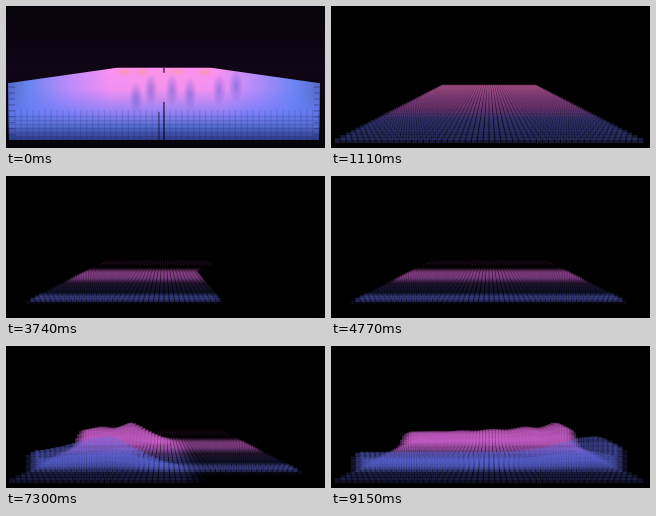
Write an HTML page with a canvas that moves like this. It is 319 by 142 pixels and loops after 9170 ms.

```html
<!DOCTYPE html>
<html>
<head>
<meta charset="utf-8">
<style>
html, body { margin: 0; width: 100%; height: 100%; overflow: hidden; background: #000; }
canvas { display: block; }
</style>
</head>
<body>
<canvas id="stage" width="319" height="142"></canvas>
<script>
const ctx = document.getElementById('stage').getContext('2d');
const LOOP = 9170, CX = 158, HORIZON = 55, HALF = 1.886;
const NEAR = 82, FAR = 25, ROWS = 60, COLS = 52;
const PITCH = 2 * HALF / COLS, SPEED = 1.25;

const clamp = (v, lo = 0, hi = 1) => Math.max(lo, Math.min(hi, v));
const smooth = (a, b, v) => { const k = clamp((v - a) / (b - a)); return k * k * (3 - 2 * k); };
const bump = (v, mid, width) => Math.exp(-(((v - mid) / width) ** 4));
const mix = (a, b, k) => a.map((v, i) => v + (b[i] - v) * k);

const BLUE = [98, 108, 228], PINK = [208, 100, 210], ROSE = [222, 108, 176];

// Rows from back to front; s is the perspective scale of a row
const rows = Array.from({ length: ROWS }, (_, i) => {
  const far = 1 - i / (ROWS - 1);
  const s = NEAR / (1 + far * (NEAR / FAR - 1));
  const rgb = s < 44 ? mix(ROSE, PINK, (s - FAR) / (44 - FAR)) : mix(PINK, BLUE, smooth(46, 64, s));
  return {
    s,
    color: `rgb(${rgb.map(Math.round)})`,
    glow: 0.32 * bump(s, 46, 6) + 0.36 * bump(s, 69, 4) + 0.1 * bump(s, 58, 6) + 0.03 * bump(s, 33, 3),
    wake: 0.17 * smooth(36, 44, s),
    rise: clamp(bump(s, 43.5, 4.5) + bump(s, 71, 4.5) + 0.25 * bump(s, 58, 9)),
    lead: 0.65 * (1 - smooth(34, 42, s)),
    front: s > 58
  };
});

// Height of the travelling swell; d is the distance behind its crest
function swell(d, front) {
  if (d < 0) return 0.5 * Math.exp(-((-d / 0.65) ** 1.5));
  if (front) return 0.27 + 0.23 * Math.exp(-2 * d * d);
  return 0.27 + 0.23 * Math.exp(-0.8 * d) * (0.82 + 0.18 * Math.cos(d * 8.4));
}

function drawColumn(u, s, height) {
  const w = PITCH * s * 0.86, x = CX + u * s - w / 2;
  for (let y = 0; y < height - 0.005; y += PITCH) {
    const h = Math.min(PITCH * 0.92, height - y) * s;
    ctx.fillRect(x, HORIZON + s - y * s - h, w, h);
  }
}

function drawGrid(t) {
  const edge = -0.5 + 1.22 * (t - 2.68);
  const crest = -1.86 + SPEED * (t - 6.43);
  const floor = 0.24 * clamp((1.9 - t) / 0.79, 0, 1.4);
  for (const row of rows) {
    ctx.fillStyle = row.color;
    for (let c = 0; c < COLS; c++) {
      const u = (c + 0.5) * PITCH - HALF, d = crest - u;
      const lit = smooth(-0.05, 0.07, edge + row.lead - u);
      const height = Math.max(PITCH * 0.85, swell(d, row.front) * row.rise);
      const wake = smooth(-1.35, -0.95, d) * row.wake;
      const alpha = floor + lit * (row.glow + wake) / (1 + 1.6 * height);
      if (alpha < 0.008) continue;
      ctx.globalAlpha = alpha;
      drawColumn(u, row.s, height);
    }
  }
  ctx.globalAlpha = 1;
}

function drawEdges() {
  ctx.strokeStyle = 'rgba(60,60,130,.16)';
  ctx.setLineDash([2, 3]);
  ctx.beginPath();
  for (const side of [-1, 1]) {
    ctx.moveTo(CX + side * HALF * 32, HORIZON + 32);
    ctx.lineTo(CX + side * HALF * NEAR, HORIZON + NEAR);
  }
  ctx.stroke();
  ctx.setLineDash([]);
}

function gradient(x1, y1, x2, y2, stops) {
  const g = ctx.createLinearGradient(x1, y1, x2, y2);
  stops.forEach(([at, color]) => g.addColorStop(at, color));
  return g;
}

function blob(x, y, rx, ry, color) {
  ctx.save();
  ctx.translate(x, y);
  ctx.scale(rx, ry);
  const g = ctx.createRadialGradient(0, 0, 0, 0, 0, 1);
  g.addColorStop(0, `rgba(${color},.45)`);
  g.addColorStop(1, `rgba(${color},0)`);
  ctx.fillStyle = g;
  ctx.fillRect(-1, -1, 2, 2);
  ctx.restore();
}

// The whole volume glowing, sinking towards the floor
function drawVolume(t) {
  const left = 1 - clamp((t - 0.06) / 0.88);
  if (!left) return;
  const height = 0.73 * left;
  const back = HORIZON + FAR * (1 - height), front = HORIZON + NEAR * (1 - height);
  ctx.save();
  ctx.globalAlpha = left * left;
  ctx.fillStyle = gradient(0, 0, 0, 142, [[0, '#06030a'], [0.45, '#100616'], [1, '#05030a']]);
  ctx.fillRect(0, 0, 319, 142);
  ctx.beginPath();
  [[2, front], [111, back], [205, back], [314, front], [313, 134], [3, 134]].forEach(p => ctx.lineTo(...p));
  ctx.clip();
  ctx.fillStyle = gradient(2, 0, 314, 0, [
    [0, '#5468c4'], [0.07, '#6c86f0'], [0.2, '#c48cfa'], [0.33, '#fc92f2'], [0.5, '#ff94ea'],
    [0.67, '#fc92f2'], [0.8, '#b48cfa'], [0.92, '#6c86f0'], [1, '#5468c4']]);
  ctx.fillRect(0, 0, 319, 142);
  ctx.fillStyle = gradient(0, back, 0, 134, [
    [0, 'rgba(100,120,250,0)'], [0.3, 'rgba(100,120,250,.08)'], [0.62, 'rgba(100,122,246,.7)'],
    [0.8, '#566ed2'], [1, '#2c3a88']]);
  ctx.fillRect(0, back, 319, 142);
  for (const x of [118, 136, 172, 198]) blob(x, back + 4, 10, 5, '255,150,120');
  for (const [x, y] of [[130, 92], [145, 84], [166, 84], [184, 88], [213, 84], [230, 80]])
    blob(x, y, 7, 17, '70,80,200');
  ctx.fillStyle = 'rgba(10,10,50,.12)';
  const step = PITCH * NEAR;
  for (let x = CX % step; x < 319; x += step) ctx.fillRect(x - 0.6, 104, 1.2, 30);
  for (let y = 134; y > 108; y -= 4) ctx.fillRect(0, y, 319, 1.2);
  ctx.fillStyle = 'rgba(10,10,50,.3)';
  for (let y = 134; y > front; y -= step) {
    ctx.fillRect(0, y, 9, 1.2);
    ctx.fillRect(308, y, 9, 1.2);
  }
  ctx.fillStyle = 'rgba(5,2,20,.8)';
  ctx.fillRect(157.3, back, 1.3, 5);
  ctx.fillRect(157.3, 96, 1.3, 38);
  ctx.fillRect(152.6, 106, 0.8, 28);
  ctx.restore();
}

function draw() {
  const t = performance.now() % LOOP / 1000;
  ctx.fillStyle = '#000';
  ctx.fillRect(0, 0, 319, 142);
  if (t > 1.9) drawEdges();
  if (t > 0.06) drawGrid(t);
  drawVolume(t);
  requestAnimationFrame(draw);
}
draw();
</script>
</body>
</html>
```
